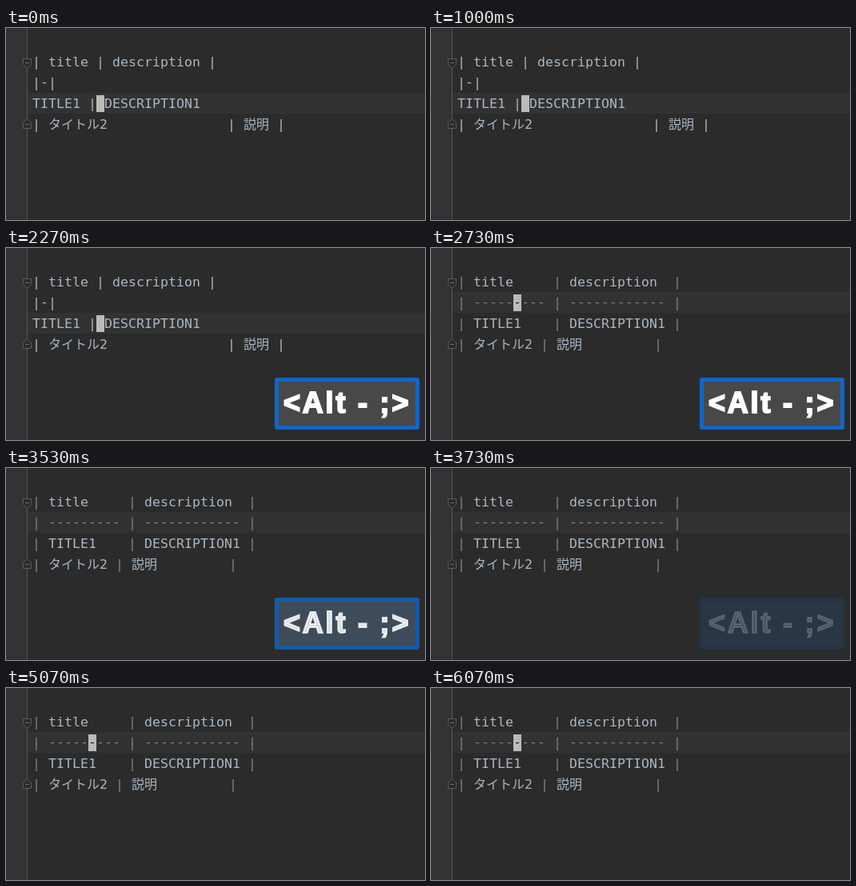
Write an HTML page with a canvas that moves like this. It is 524 by 240 pixels and loops after 6190 ms.

```html
<!DOCTYPE html>
<html lang="ja">
<meta charset="utf-8">
<title>Table formatting</title>
<style>
html, body { margin: 0; width: 100%; height: 100%; overflow: hidden; background: #2b2b2b; }
canvas { display: block; }
</style>
<canvas id="stage" width="524" height="240"></canvas>
<script>
const g = document.getElementById('stage').getContext('2d');
const LOOP = 6190, TICK = 1000 / 15, FORMAT_AT = 2395;
const LEFT = 33, TOP = 29, ROW = 26, CELL = 10, WIDE = 16;
const TEXT = '#a9b7c6', DIM = '#808080';
const LATIN = '16.6px "DejaVu Sans Mono", monospace';
const KANA = '300 16px "Noto Sans CJK JP", "Noto Sans CJK", sans-serif';

const rough = [
  '| title | description |',
  '|-|',
  'TITLE1 | DESCRIPTION1',
  '| タイトル2' + ' '.repeat(15) + '| 説明 |'
];
const neat = [
  '| title     | description  |',
  '| ' + '-'.repeat(9) + ' | ' + '-'.repeat(12) + ' |',
  '| TITLE1    | DESCRIPTION1 |',
  '| タイトル2 | 説明         |'
];
// times at which the caret is shown
const caretOn = [[0, 530], [1000, 1530], [2000, 3530], [4000, 4530], [5000, 5530], [6070, LOOP]];

const clamp = v => Math.max(0, Math.min(1, v));

function rect(color, x, y, w, h) {
  g.fillStyle = color;
  g.fillRect(x, y, w, h);
}

function path(points) {
  g.beginPath();
  points.forEach(([x, y]) => g.lineTo(x, y));
  g.closePath();
}

function fold(y, dir) {
  path([[21.5, y], [31.5, y], [31.5, y + 7 * dir], [26.5, y + 12 * dir], [21.5, y + 7 * dir]]);
  g.fillStyle = '#2b2b2b';
  g.strokeStyle = '#5c5c5c';
  g.lineWidth = 1;
  g.fill();
  g.stroke();
  rect('#6c6c6c', 24, Math.floor(y + 5 * dir), 5, 1);
}

function line(text, row, dimMarks) {
  let x = LEFT;
  for (const c of text) {
    const wide = c > '\u00ff', mark = c === '|' || c === '-';
    g.font = wide ? KANA : LATIN;
    g.fillStyle = dimMarks && mark ? DIM : TEXT;
    g.fillText(c, x, TOP + row * ROW + (c === '-' ? 18 : 19));
    x += wide ? WIDE : CELL;
  }
}

function caret(col, row, under) {
  const x = LEFT + col * CELL, y = TOP + row * ROW;
  rect('#bbbbbb', x, y + 3, CELL, 21);
  g.font = LATIN;
  g.fillStyle = '#2b2b2b';
  g.fillText(under, x, y + 18);
}

function keyBadge(alpha) {
  g.save();
  g.globalAlpha = alpha;
  g.fillStyle = '#1166c8';
  g.beginPath();
  g.roundRect(336, 162, 181, 65, 3);
  g.fill();
  rect('#484848', 341, 167, 171, 55);
  g.font = 'bold 36px "Liberation Sans", Arial, sans-serif';
  g.letterSpacing = '2.8px';
  g.fillStyle = g.strokeStyle = '#fff';
  g.lineWidth = 2;
  g.strokeText('<Alt - ;>', 347, 206);
  g.fillText('<Alt - ;>', 347, 206);
  g.restore();
}

function draw(t) {
  const done = t >= FORMAT_AT, current = done ? 1 : 2;
  rect('#2b2b2b', 0, 0, 524, 240);
  rect('#313335', 0, 0, 26, 240);
  rect('#323232', 27, TOP + current * ROW, 497, ROW);
  rect('#555555', 26, 0, 1, 240);
  fold(38.5, 1);
  fold(125.5, -1);
  (done ? neat : rough).forEach((text, row) => line(text, row, done));

  if (caretOn.some(([from, to]) => t >= from && t < to)) {
    if (done) caret(7, 1, '-');
    else caret(8, 2, ' ');
  }

  // the badge fades in steps of the recording rate
  const step = Math.floor((t + 5) / TICK) * TICK;
  const alpha = clamp((step - 1933) / 270) * clamp((3780 - step) / 305);
  if (alpha > 0) keyBadge(alpha);
}

const start = performance.now();
function frame() {
  draw((performance.now() - start) % LOOP);
  requestAnimationFrame(frame);
}
frame();
</script>
</html>
```
